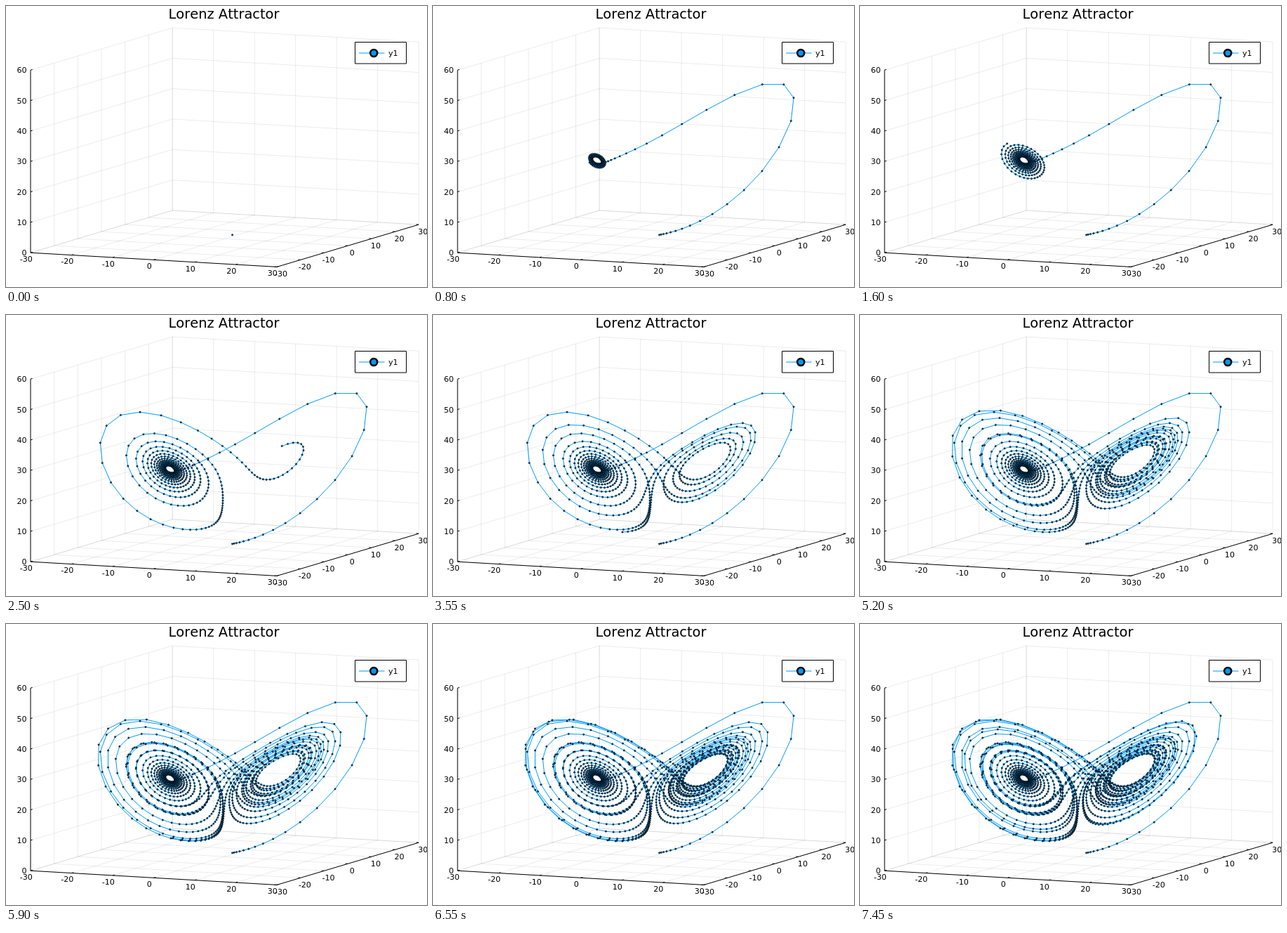
These frames come from a looping animation (600 px wide and 400 px high, 7.5 s). An HTML page with a canvas:

```html
<!DOCTYPE html>
<html lang="en">
<head>
<meta charset="utf-8">
<title>Lorenz Attractor</title>
<style>
html, body { margin: 0; width: 600px; height: 400px; overflow: hidden; background: #fff; }
canvas { display: block; }
</style>
</head>
<body>
<canvas id="stage" width="600" height="400"></canvas>
<script>
const ctx = document.getElementById('stage').getContext('2d');
const BLUE = '#009afa';
const STEP_MS = 50, STEPS = 150, PER_STEP = 10;
const TICKS = [0, 1, 2, 3, 4, 5, 6];

// Parallel projection of the box x, y in -30..30 and z in 0..60
function project(x, y, z) {
  const u = (x + 30) / 60, v = (y + 30) / 60, w = z / 60;
  return [35 + 351 * u + 202.2 * v, 351.2 + 20.2 * u - 60.2 * v - 260 * w];
}

function lorenz(count) {
  const dt = 0.02, sigma = 10, rho = 28, beta = 8 / 3;
  let x = 1, y = 1, z = 1;
  const path = [];
  for (let i = 0; i < count; i++) {
    // each coordinate uses the ones already advanced
    x += dt * (sigma * (y - x));
    y += dt * (x * (rho - z) - y);
    z += dt * (x * y - beta * z);
    path.push(project(x, y, z));
  }
  return path;
}

function line(points, color, width = 1) {
  ctx.beginPath();
  for (const [x, y] of points) ctx.lineTo(x, y);
  ctx.strokeStyle = color;
  ctx.lineWidth = width;
  ctx.stroke();
}

function dot(x, y, r, border) {
  ctx.beginPath();
  ctx.arc(x, y, r, 0, 2 * Math.PI);
  ctx.fillStyle = BLUE;
  ctx.fill();
  ctx.strokeStyle = '#000';
  ctx.lineWidth = border;
  ctx.stroke();
}

function label(text, x, y, align = 'center', size = 11.11) {
  ctx.font = size + 'px "DejaVu Sans", sans-serif';
  ctx.textAlign = align;
  ctx.fillStyle = '#000';
  ctx.fillText(text, x, y);
}

function drawGrid() {
  const color = 'rgba(0,0,0,0.08)';
  for (const i of TICKS) {
    const a = i * 10 - 30, z = i * 10;
    line([project(a, -30, 0), project(a, 30, 0), project(a, 30, 60)], color);
    line([project(30, a, 0), project(-30, a, 0), project(-30, a, 60)], color);
    line([project(-30, -30, z), project(-30, 30, z), project(30, 30, z)], color);
  }
}

function drawAxes() {
  line([project(-30, -30, 60), project(-30, -30, 0),
        project(30, -30, 0), project(30, 30, 0)], '#000');
  for (const i of TICKS) {
    const a = i * 10 - 30, z = i * 10;
    const px = project(a, -30, 0), py = project(30, a, 0), pz = project(-30, -30, z);
    line([px, project(a, -29.2, 0)], '#000');
    line([py, project(29.4, a, 0)], '#000');
    line([pz, project(-30, -29.2, z)], '#000');
    label(a, px[0] - 6.3, px[1] + 12.9);
    label(a, py[0] + 6.1, py[1] + 13.4);
    label(z, 29.6, pz[1] + 4.2, 'right');
  }
}

function drawLegend() {
  ctx.fillStyle = '#fff';
  ctx.fillRect(497.5, 51.5, 73, 30.5);
  ctx.strokeStyle = '#000';
  ctx.lineWidth = 1;
  ctx.strokeRect(497.5, 51.5, 73, 30.5);
  line([[503, 67], [539.5, 67]], BLUE);
  dot(524.2, 67, 5, 2.6);
  label('y1', 545, 71, 'left');
}

const path = lorenz(STEPS * PER_STEP);

function draw(step) {
  const shown = path.slice(0, step * PER_STEP + 1);
  ctx.fillStyle = '#fff';
  ctx.fillRect(0, 0, 600, 400);
  drawGrid();
  drawAxes();
  label('Lorenz Attractor', 310.5, 18, 'center', 19.44);
  line(shown, BLUE);
  for (const [x, y] of shown) dot(x, y, 1, 1);
  drawLegend();
}

ctx.lineJoin = 'round';
ctx.fontKerning = 'none';
let last = -1;
const start = performance.now();

function tick() {
  const step = Math.floor((performance.now() - start) / STEP_MS) % STEPS;
  if (step !== last) draw(last = step);
  requestAnimationFrame(tick);
}
tick();
</script>
</body>
</html>
```
